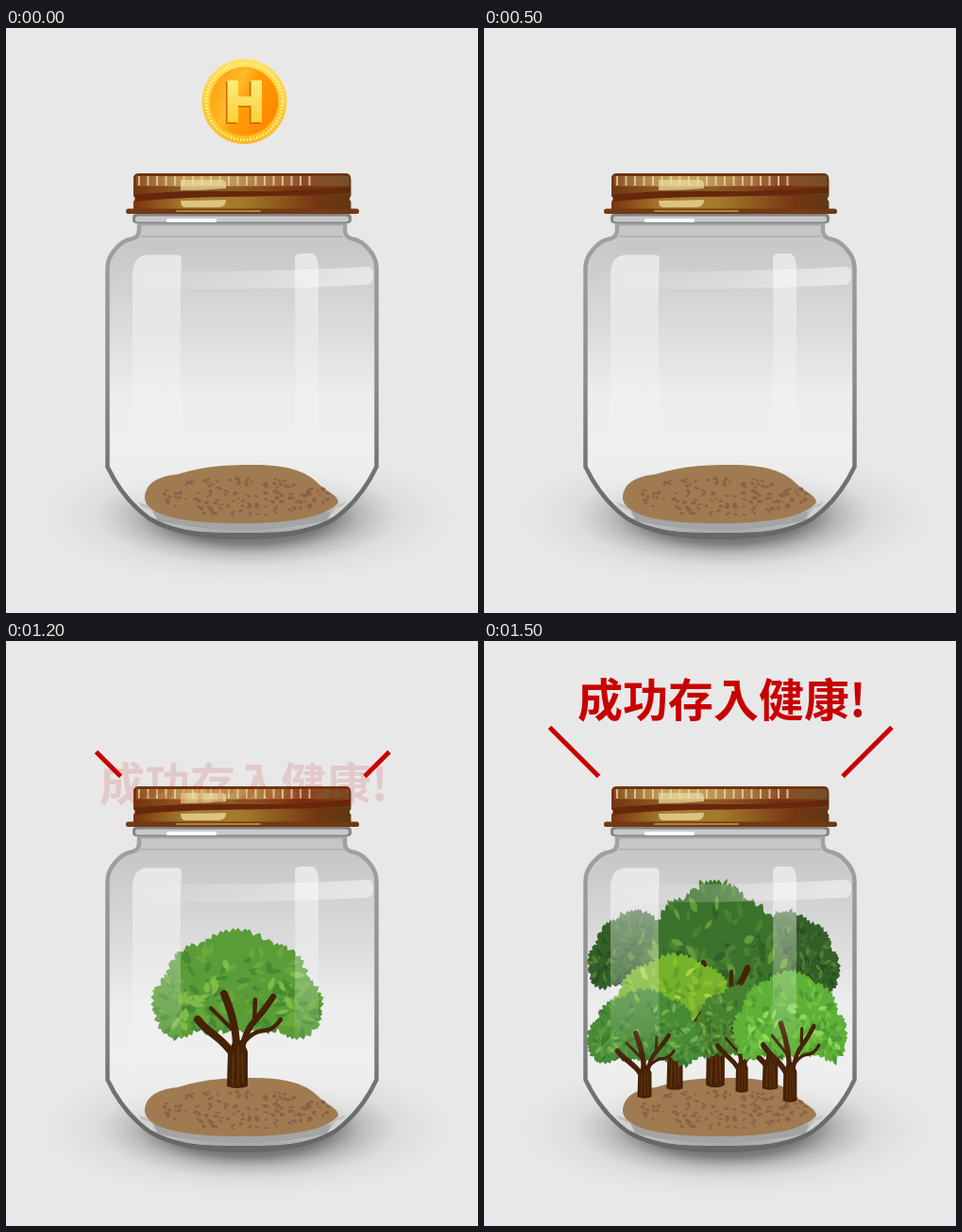
Write an HTML page that moves like this. It is 500 px wide and 620 px high and loops after 3.5 s.

```html
<!DOCTYPE html>
<html lang="zh-Hant">
<head>
<meta charset="utf-8">
<title>Jar</title>
<style>
html, body { margin: 0; width: 100%; height: 100%; overflow: hidden; background: #e8e8e8; }
svg { display: block; width: 500px; height: 620px; }
#title { font: 700 48px "Noto Sans CJK TC", "Noto Sans CJK SC", "Noto Sans CJK JP", "Noto Sans CJK", sans-serif; fill: #c80000; }
</style>
</head>
<body>
<svg viewBox="0 0 500 620" xmlns="http://www.w3.org/2000/svg">
  <defs>
    <radialGradient id="shade">
      <stop offset="0" stop-color="#444" stop-opacity=".9"/>
      <stop offset=".4" stop-color="#505050" stop-opacity=".7"/>
      <stop offset=".54" stop-color="#666" stop-opacity=".36"/>
      <stop offset=".72" stop-color="#888" stop-opacity=".12"/>
      <stop offset="1" stop-color="#aaa" stop-opacity="0"/>
    </radialGradient>
    <linearGradient id="inside" gradientUnits="userSpaceOnUse" x1="0" y1="207" x2="0" y2="540">
      <stop offset="0" stop-color="#c4c4c4"/>
      <stop offset=".12" stop-color="#cbcbcb"/>
      <stop offset=".34" stop-color="#dcdcdc"/>
      <stop offset=".55" stop-color="#ededed"/>
      <stop offset=".7" stop-color="#efefef"/>
      <stop offset="1" stop-color="#efefef" stop-opacity=".45"/>
    </linearGradient>
    <linearGradient id="wall" gradientUnits="userSpaceOnUse" x1="0" y1="207" x2="0" y2="541">
      <stop offset="0" stop-color="#a2a2a2"/>
      <stop offset=".5" stop-color="#8c8c8c"/>
      <stop offset="1" stop-color="#626262"/>
    </linearGradient>
    <linearGradient id="strip" gradientUnits="userSpaceOnUse" x1="0" y1="240" x2="0" y2="445">
      <stop offset="0" stop-color="#fff" stop-opacity=".56"/>
      <stop offset=".4" stop-color="#fff" stop-opacity=".32"/>
      <stop offset=".78" stop-color="#fff" stop-opacity=".14"/>
      <stop offset="1" stop-color="#fff" stop-opacity="0"/>
    </linearGradient>
    <linearGradient id="band">
      <stop offset="0" stop-color="#fff" stop-opacity="0"/>
      <stop offset=".5" stop-color="#fff" stop-opacity=".22"/>
      <stop offset="1" stop-color="#fff" stop-opacity=".52"/>
    </linearGradient>
    <linearGradient id="lid">
      <stop offset="0" stop-color="#75340f"/>
      <stop offset=".1" stop-color="#8a551d"/>
      <stop offset=".28" stop-color="#b28a3c"/>
      <stop offset=".45" stop-color="#a67a34"/>
      <stop offset=".66" stop-color="#8b4b1d"/>
      <stop offset=".78" stop-color="#742a10"/>
      <stop offset=".88" stop-color="#6f3a16"/>
      <stop offset="1" stop-color="#664018"/>
    </linearGradient>
    <linearGradient id="lidLow">
      <stop offset="0" stop-color="#7c3410"/>
      <stop offset=".25" stop-color="#a8802f"/>
      <stop offset=".5" stop-color="#a5792c"/>
      <stop offset=".85" stop-color="#743511"/>
      <stop offset="1" stop-color="#5f3812"/>
    </linearGradient>
    <linearGradient id="sheen">
      <stop offset="0" stop-color="#f0d49a" stop-opacity=".15"/>
      <stop offset=".3" stop-color="#f0d49a" stop-opacity=".4"/>
      <stop offset="1" stop-color="#f0d49a" stop-opacity=".1"/>
    </linearGradient>
    <linearGradient id="rim" x2="0" y2="1">
      <stop offset="0" stop-color="#ffe25a"/>
      <stop offset="1" stop-color="#ffb91c"/>
    </linearGradient>
    <linearGradient id="face" x2="1" y2=".5">
      <stop offset="0" stop-color="#ff9d0a"/>
      <stop offset=".45" stop-color="#ffb92a"/>
      <stop offset=".6" stop-color="#ff9c08"/>
      <stop offset="1" stop-color="#ff8a00"/>
    </linearGradient>
    <linearGradient id="letter" x2="0" y2="1">
      <stop offset="0" stop-color="#ffec7c"/>
      <stop offset="1" stop-color="#ffcf36"/>
    </linearGradient>
    <radialGradient id="fade" gradientUnits="userSpaceOnUse" cx="252" cy="87" r="41">
      <stop offset="0" stop-color="#fff" stop-opacity=".95"/>
      <stop offset=".4" stop-color="#fff" stop-opacity=".6"/>
      <stop offset="1" stop-color="#fff" stop-opacity="0"/>
    </radialGradient>
    <mask id="glow" maskUnits="userSpaceOnUse" x="200" y="20" width="110" height="120">
      <rect x="200" y="20" width="110" height="120" fill="url(#fade)"/>
    </mask>
    <path id="h" d="M234.500 55.500H246V72.500H259.500V55.500H271V100H259.500V82.500H246V100H234.500Z"/>
    <path id="jar" d="M141 207V214Q141 222 133 223.500C122 225 107.500 240 107.500 254V465C118 487 134 507 152 520C176 535 212 539 250 539C288 539 324 535 348 520C366 507 382 487 392.500 465V254C392.500 240 378 225 367 223.500Q359 222 359 214V207Z"/>
  </defs>

  <rect width="500" height="620" fill="#e8e8e8"/>
  <ellipse cx="256" cy="517" rx="220" ry="74" fill="url(#shade)"/>
  <use href="#jar" fill="url(#inside)"/>
  <path d="M140 502C176 522 324 522 360 502L346 520C322 536 178 536 154 520Z" fill="#bcbcbc"/>
  <path d="M156 512Q250 534 344 512L340 522Q250 543 160 522Z" fill="#a4a4a4"/>
  <path d="M140 505L154 511L160 520L153 519ZM360 505L350 508L341 521L347 519Z" fill="#d2d2d2"/>
  <path d="M147 499C147 483 160 475 182 473C205 466 225 463 262 463C298 463 318 470 330 482C340 492 352 495 352 503C338 519 300 525 250 525C196 525 150 519 147 499Z" fill="#a07b51"/>
  <path id="specks" fill="#8d6047"/>
  <g id="plants"></g>

  <path d="M134 262Q134 241 150 240.500H182Q186 241 186 246Q183 300 187 445H134Z" fill="url(#strip)"/>
  <path d="M306 243Q307 239 314 239H324Q330 240 331 252V445H305Q307 330 306 243Z" fill="url(#strip)"/>
  <path d="M112 257Q260 260 383 253Q389 253 389 261Q389 271 383 272Q260 279 112 276Z" fill="url(#band)"/>
  <use href="#jar" fill="none" stroke="url(#wall)" stroke-width="4.500"/>
  <path d="M152 520C176 534 212 535 250 535C288 535 324 534 348 520C326 538 288 542 250 542C212 542 174 538 152 520Z" fill="#686868"/>
  <path d="M143 221H357" stroke="#b4b4b4" stroke-width="2"/>
  <rect x="134" y="197" width="232" height="10" rx="4" fill="#858585"/>
  <rect x="137" y="199.500" width="226" height="6" rx="3" fill="#c9c9c9"/>
  <rect x="170" y="202" width="53" height="4" rx="1.500" fill="#fff"/>

  <path d="M135 160Q135 154 141 154H359Q365.500 154 365.500 161V178L363.500 181L365.500 184V193H135V184L137 181L135 178Z" fill="url(#lid)"/>
  <path d="M135 160Q135 154 141 154H359Q365 154 365 159L363 157H138Z" fill="#6d3712"/>
  <rect x="138" y="157" width="225" height="10.500" fill="url(#sheen)"/>
  <path d="M136 168H365V171Q250 172 136 177Z" fill="#6f3510" opacity=".45"/>
  <path id="ribs" stroke="#ecd6a4" stroke-width="2" opacity=".8"/>
  <path d="M136.500 181Q220 179 364 177V193H136Z" fill="url(#lidLow)"/>
  <path d="M136 177Q175 172 250 173Q320 173 365 168V175Q310 178 230 179Q170 180 138 184Z" fill="#66270d"/>
  <path d="M185 161H230Q234 162 233 170Q210 172 185 172Z" fill="#eddda5" opacity=".7"/>
  <path d="M185 183Q210 183 233 182Q233 190 225 190H189Q185 189 185 183Z" fill="#e6d196" opacity=".85"/>
  <rect x="127" y="191.500" width="247" height="5.500" rx="2.500" fill="#713a12"/>
  <rect x="180" y="193" width="90" height="2" rx="1" fill="#c89a4c" opacity=".75"/>

  <g id="coin">
    <circle cx="252.500" cy="78" r="45" fill="url(#rim)"/>
    <circle cx="252.500" cy="78" r="40.500" fill="none" stroke="#fff2a0" stroke-width="3" stroke-dasharray="1.500 2"/>
    <circle cx="252.500" cy="78" r="36" fill="url(#face)" stroke="#f9a512"/>
    <use href="#h" x="-1.500" y="1.500" fill="#c16a00"/>
    <use href="#h" fill="url(#letter)"/>
  </g>
  <path id="rays" stroke="#c80000" stroke-width="5"/>
  <text id="title" x="99">成功存入健康!</text>
</svg>
<script>
const $ = id => document.getElementById(id);
const NS = 'http://www.w3.org/2000/svg';
const add = (parent, tag, attrs) => {
  const el = parent.appendChild(document.createElementNS(NS, tag));
  for (const k in attrs) el.setAttribute(k, attrs[k]);
  return el;
};
const seeded = seed => () => {
  seed = (seed * 16807) % 2147483647;
  return seed / 2147483647;
};

// pointed leaf of length l, half width w, turned by a
function leaf(x, y, a, l, w) {
  const c = Math.cos(a), s = Math.sin(a);
  const at = (u, v) => (x + u * c - v * s).toFixed(1) + ' ' + (y + u * s + v * c).toFixed(1);
  return `M${at(0, 0)}Q${at(l * .45, -w * 2)} ${at(l, 0)}Q${at(l * .45, w * 2)} ${at(0, 0)}Z`;
}

// crown clumps: x, y, radius, tone; measured from the foot of the trunk
const clumps = [
  [30, -86, 25, 0], [-30, -86, 26, 0], [0, -112, 52, 1],
  [36, -113, 36, 1], [-36, -114, 36, 1], [58, -88, 29, 1], [-58, -91, 29, 1],
  [64, -76, 21, 1], [-62, -78, 22, 1]
];
const limbs = [
  ['M-4 -34Q-12 -46 -24 -55T-42 -72', 8], ['M-1 -38Q0 -66 -14 -99', 8],
  ['M-6 -62L-28 -84', 4], ['M5 -42Q10 -62 18 -70T38 -96', 6.5],
  ['M18 -68L19 -93', 4.5], ['M7 -48Q18 -60 28 -60T46 -72', 4.5]
];

function drawCrown(g, tones, rnd) {
  for (const [x, y, r, tone] of clumps) {
    let d = `M${x - r} ${y}a${r} ${r} 0 1 1 ${2 * r} 0a${r} ${r} 0 1 1 ${-2 * r} 0Z`;
    const n = Math.round(r);
    for (let k = 0; k < n; k++) {
      const a = (k + rnd() * .5) / n * 6.283;
      d += leaf(x + Math.cos(a) * (r - 9), y + Math.sin(a) * (r - 9), a + rnd() * .6 - .3, 14, 4.5);
    }
    add(g, 'path', { d, fill: tones[tone] });
  }
  // loose leaves: tone, count, upward lean
  for (const [tone, count, lift] of [[0, 60, -4], [2, 75, 4], [1, 45, 0], [0, 14, 0], [3, 20, 3]]) {
    let d = '';
    for (let k = 0; k < count; k++) {
      const [x, y, r] = clumps[Math.floor(rnd() * clumps.length)];
      const a = rnd() * 6.283, q = Math.sqrt(rnd()) * (r - 9);
      d += leaf(x + Math.cos(a) * q, y + Math.sin(a) * q - lift, a + rnd() - .5, 11 + rnd() * 6, 2.2 + rnd() * 1.6);
    }
    add(g, 'path', { d, fill: tones[tone] });
  }
}

function drawBark(g) {
  const wood = { fill: 'none', stroke: '#462206', 'stroke-linecap': 'round' };
  for (const [d, w] of limbs) add(g, 'path', { ...wood, d, 'stroke-width': w });
  add(g, 'path', { d: 'M-11 -1L-10 -36L-4 -50H6L11 -38V-1Q0 3 -11 -1Z', fill: '#462206' });
  add(g, 'path', { d: 'M-5 -2L-4 -36M1 -2V-44M6 -4L5 -36', stroke: '#61340f', 'stroke-width': 1.6, fill: 'none' });
}

const green = {
  fresh: ['#478a35', '#5a9c37', '#68a93b', '#80bb47'],
  deep: ['#386d2a', '#47802f', '#568f34', '#72a63f'],
  dark: ['#305f27', '#3b722c', '#4a8232', '#669a3b'],
  dusk: ['#294f22', '#325e27', '#3d6c2c', '#508036'],
  lime: ['#64a02b', '#76b22c', '#88c030', '#a6d442'],
  spring: ['#4c9c33', '#5eb038', '#70c041', '#8fd657'],
  leafy: ['#3b7a30', '#488b37', '#57993d', '#74b04a']
};

// back to front; at: step -> x, y, x scale, y scale
const trees = [
  { tone: 'dusk', bark: 0, at: { 14: [168, 408, .45, .6], 15: [162, 408, .58, .735] } },
  { tone: 'dusk', bark: 0, at: { 14: [314, 412, .45, .6], 15: [322, 412, .61, .75] } },
  { tone: 'fresh', at: { 11: [245, 473, .6, .6], 12: [245, 473, 1, 1] } },
  { tone: 'deep', at: { 13: [245, 473, .9, 1.16] } },
  { tone: 'dark', at: { 14: [245, 473, .9, 1.24], 15: [245, 472, .9, 1.3] } },
  { crown: 0, at: { 15: [303, 475, .75, .7] } },
  { tone: 'lime', at: { 13: [202, 475, .8, .84], 14: [202, 475, .78, .86], 15: [202, 475, .78, .86] } },
  { tone: 'spring', at: { 13: [303, 475, .67, .69], 14: [303, 475, .67, .7] } },
  { tone: 'deep', at: { 14: [273, 478, .35, .4], 15: [273, 478, .6, .68] } },
  { tone: 'leafy', at: { 14: [168, 484, .46, .46], 15: [170, 484, .68, .69] } },
  { tone: 'spring', at: { 14: [323, 488, .46, .56], 15: [324, 488, .67, .83] } }
];
trees.forEach((t, i) => {
  t.el = add($('plants'), 'g', {});
  if (t.crown !== 0) drawCrown(t.el, green[t.tone], seeded(101 + i * 977));
  if (t.bark !== 0) drawBark(t.el);
});

const sprout = add($('plants'), 'g', {});
add(sprout, 'path', { d: 'M0 0Q2 -18 1 -24Q0 -31 -4 -34', fill: 'none', stroke: '#4d8f2c', 'stroke-width': 2 });
add(sprout, 'path', { d: leaf(1, -18, -3.1, 10, 2.6) + leaf(1, -17, -.3, 10, 2.6), fill: '#459c2a' });
add(sprout, 'path', { d: leaf(-3, -32, -2.53, 22, 4), fill: '#37701f' });
add(sprout, 'path', { d: leaf(-2, -31, -2.1, 16, 2.6), fill: '#4b9029' });
add(sprout, 'path', { d: leaf(1, -31, -1.4, 22, 3.7), fill: '#3b7a20' });

const rnd = seeded(4242);
let specks = '';
for (let i = 0; i < 150; i++) {
  const a = rnd() * 6.283, q = Math.sqrt(rnd());
  const x = 252 + Math.cos(a) * q * 88, y = 496 + Math.sin(a) * q * 21;
  specks += leaf(x, y, rnd() * 1.2 - .6, 3 + rnd() * 4, 1 + rnd());
}
$('specks').setAttribute('d', specks);

let ribs = '';
for (let x = 141; x < 330; x += 9.5) ribs += `M${x} 157V167`;
$('ribs').setAttribute('d', ribs);

// step -> coin drop, opacity
const coinAt = { 0: [0, 1], 1: [0, 1], 2: [-12, 1], 3: [170, .9], 4: [215, .3] };
const sproutAt = { 6: .25, 7: .5, 8: .8, 9: 1, 10: 1.5 };
// step -> baseline, opacity
const titleAt = { 12: [169, .13], 13: [66, 1], 14: [74, 1], 15: [80, 1] };

function place(el, on, transform) {
  el.style.display = on ? '' : 'none';
  if (on) el.setAttribute('transform', transform);
}

function show(step) {
  const [drop, alpha] = coinAt[step] || [0, 0];
  const coin = $('coin');
  place(coin, alpha, `translate(0 ${drop})`);
  coin.setAttribute('opacity', alpha);
  coin.setAttribute('mask', drop > 0 ? 'url(#glow)' : 'none');

  place(sprout, sproutAt[step], `translate(247 473) scale(${sproutAt[step]})`);
  for (const t of trees) {
    const p = t.at[step];
    place(t.el, p, p && `translate(${p[0]} ${p[1]}) scale(${p[2]} ${p[3]})`);
  }

  const len = Math.max(0, Math.min(4, step - 10)) * 13;
  $('rays').setAttribute('d', len ? `M121.500 143.500l${-len} ${-len}M380 143.500l${len} ${-len}` : '');
  const [base, op] = titleAt[step] || [80, 0];
  $('title').setAttribute('y', base);
  $('title').setAttribute('opacity', op);
}

const start = performance.now();
let last = -1;
function tick() {
  const step = Math.min(15, Math.floor((performance.now() - start) % 3500 / 100));
  if (step !== last) show(last = step);
  requestAnimationFrame(tick);
}
tick();
</script>
</body>
</html>
```
